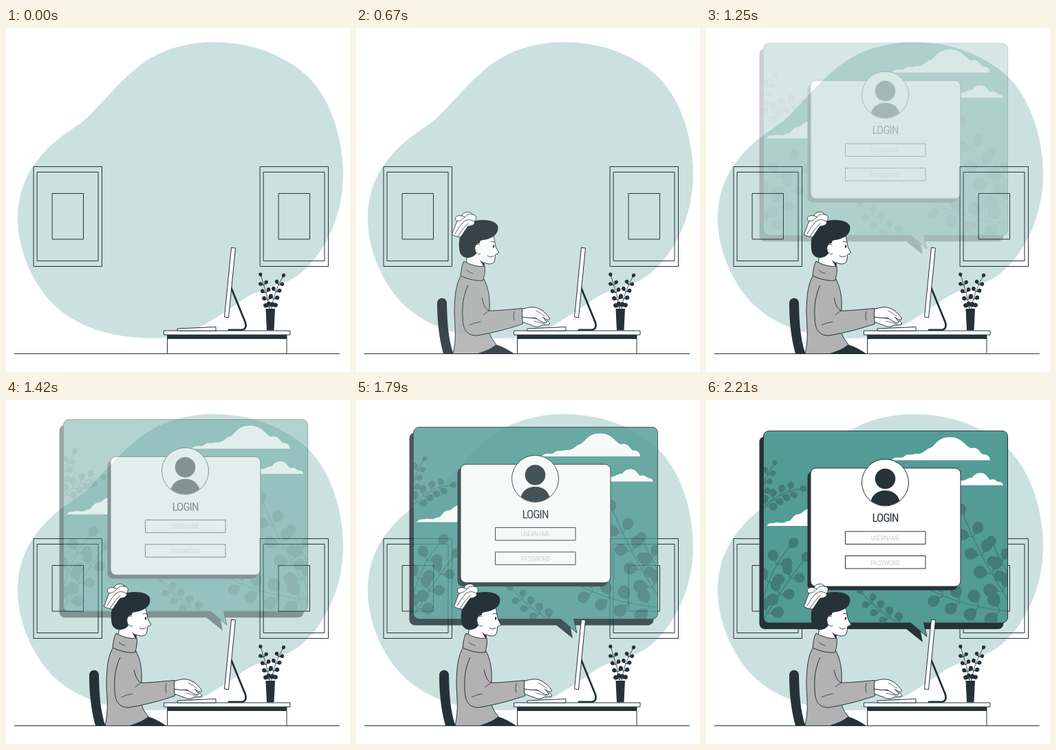
An HTML page that plays this animation: 500 by 500 pixels, repeating every 2250 ms.

```html
<!DOCTYPE html>
<html lang="en">
<head>
<meta charset="utf-8">
<title>Login</title>
<style>
  html, body { margin: 0; width: 100%; height: 100%; overflow: hidden; background: #fff; }
  svg { display: block; width: 100vw; height: 100vh; }
  .line { fill: none; stroke: #263238; stroke-linecap: round; stroke-linejoin: round; }
  .white { fill: #fff; stroke: #263238; stroke-linejoin: round; }
  .wool { fill: #b2b2b2; stroke: #263238; stroke-linejoin: round; }
  .dark { fill: #263238; }
  .teal { fill: #539b95; }
  text { font-family: "Roboto Condensed", "Roboto", "Open Sans", sans-serif; font-stretch: 75%; text-anchor: middle; }
  .title { font-size: 17px; letter-spacing: -.9px; fill: #263238; }
  .hint { font-size: 9.8px; font-weight: 300; letter-spacing: -.3px; fill: #b4b8ba; }
</style>
</head>
<body>
<svg viewBox="0 0 500 500">
  <defs>
    <clipPath id="screen"><rect x="84" y="45.500" width="354" height="278" rx="8"/></clipPath>
    <clipPath id="round"><circle cx="260.500" cy="120" r="33.500"/></clipPath>
    <g id="picture" class="line">
      <rect x="40.500" y="201.500" width="99" height="145"/>
      <rect x="45.500" y="209.500" width="88.500" height="129"/>
      <rect x="67.500" y="240.500" width="45" height="66.500"/>
    </g>
  </defs>

  <path fill="#cbe1df" d="M302 20.500C357 20.500 407 40 440 72C473 105 490 162 490 212C490 275 462 330 425 359C395 380 372 374 340 398C295 429 262 451 215 451C150 451 85 432 50 379C28 346 17 309 17 277C17 240 30 210 50 187C75 157 100 146 115 133C140 110 170 70 205 47C235 28 270 20.500 302 20.500Z"/>
  <use href="#picture"/>
  <use href="#picture" x="329"/>
  <path class="line" d="M12.500 473.500H484.500"/>

  <g id="panel">
    <g class="dark">
      <rect x="77.500" y="53" width="355" height="280" rx="8"/>
      <path d="M290 332L315 352L311 332Z"/>
    </g>
    <rect class="teal" x="83.500" y="45" width="355" height="279" rx="8" stroke="#263238"/>
    <path class="teal" d="M297 323.500L321 344L316.500 323.500" stroke="#263238"/>
    <path class="teal" d="M297.500 322.500H316V325H299Z"/>
    <g clip-path="url(#screen)">
      <g id="foliage"></g>
      <g fill="#fff">
        <path d="M270 87.500C275 81 282 85 287 83C292 77 299 81 305 78C315 80 318 72 325 70C333 68 335 54 355 54C372 54 378 68 385 70C395 67 398 76 402 79C410 78 413 84 413 87.500Z"/>
        <path d="M368 124V117C376 119 383 111 387 113C390 107 395 106 400 106C407 106 410 114 413 116C420 113 422 119 426 119C431 119 432 124 432 124Z"/>
        <path d="M88 183C92 177 98 180 102 178C108 178 112 180 118 176C124 178 126 166 134 166C140 166 140 160 152 157V183Z"/>
      </g>
    </g>
    <rect class="dark" x="147.500" y="104" width="218" height="172.500" rx="8"/>
    <rect class="white" x="152" y="99" width="218" height="172" rx="8"/>
    <circle class="white" cx="260.500" cy="120" r="34"/>
    <g class="dark" clip-path="url(#round)">
      <circle cx="260.500" cy="114.500" r="14.800"/>
      <path d="M238.500 154C239 139 248 131.500 260.500 131.500S282 139 282.500 154Z"/>
    </g>
    <text class="title" x="260.500" y="177.300">LOGIN</text>
    <rect class="white" x="202.500" y="191" width="116.500" height="18.500"/>
    <rect class="white" x="202.500" y="226.500" width="116.500" height="18.500"/>
    <text class="hint" x="260.500" y="204">USERNAME</text>
    <text class="hint" x="260.500" y="239.700">PASSWORD</text>
  </g>

  <g id="desk">
    <path class="line" stroke-width="2.800" d="M327 377L347.500 427C350 434 348 439 341 439H324"/>
    <path class="white" d="M327.500 319L333.500 320L323.500 421L317.500 420Z"/>
    <rect class="white" x="234.500" y="446" width="173.500" height="27.500"/>
    <rect class="dark" x="234.500" y="446" width="173.500" height="6"/>
    <rect class="white" x="229.500" y="440" width="183.500" height="6"/>
    <path class="white" d="M249 437L305 434.500V440H249Z"/>
    <g id="plant"></g>
    <path class="dark" d="M377.500 408H391L389.500 439.500H379Z"/>
  </g>

  <g id="worker">
    <path class="dark" d="M121 400C121 391 134 390 135 399C135.500 426 137 452 144.500 473.500H130C123.500 450 121 425 121 400Z"/>
    <path class="dark" d="M178 473.500L206 460C216 463 225 468 233 473.500Z"/>
    <path class="wool" d="M156 359C148 372 146.500 390 146 410C146 430 150 447 144 473.500H180C190 470 200 467 207 460C203 455 199 450 197 443L197 408C198 392 195 376 189 365Z"/>
    <path class="white" d="M244 420C256 421 268 422 276 426C282 425 286 428 284 431C280 432 277 431 273 432C268 436 262 434 258 432C252 430 248 428 244 427Z"/>
    <path class="white" d="M244 409C252 406 262 404 269 408C276 411 281 417 284.500 422C284.500 426 279 424 274 420C278 424 281 427 279 429C273 428 268 424 263 421C257 422 251 421 244 420Z"/>
    <path class="line" stroke-width=".7" d="M265 411Q271 414 277 419M262 426Q270 428 277 430"/>
    <path class="wool" d="M166 374C159 388 157 405 158 420C158 436 163 447 178 447C203 443 225 437 245.500 430C244 422 244 415 245 407.500C228 409 210 411 196 411C191 408 188 402 186 392"/>
    <path class="line" stroke-width=".8" d="M233 412Q231 420 233 425M196 411Q192 414 188 417M168 432Q175 428 184 427"/>

    <path class="white" d="M183 306L203 302C205 310 205 315 207 320L210.500 326C210 329 206 328 205.500 330L205 336C204 342 201 343 196 343L188 341L189 350L163 346L165 325Z"/>
    <path class="dark" d="M183 337L190 343L189 348Z"/>
    <path class="dark" d="M154 326C150 306 156 286 177 280C194 277 210 281 209.500 291C209 302 198 307 184 309C180 317 182 329 171 333C163 336 156 332 154 326Z"/>
    <path fill="#fff" d="M186 314C179 311 175 316 176 322C177 329 182 331 187 328Z"/>
    <path class="line" stroke-width=".8" d="M183 315C178 312 175 317 176 322C177 328 181 330 184 328"/>
    <ellipse class="dark" cx="203" cy="317.500" rx="1.200" ry="2.300"/>
    <path class="line" stroke-width=".9" d="M199 311Q202 309 204 311M194 331Q199 335 203 331"/>
    <path class="wool" d="M160 339C157 344 156 352 155 360C165 365 178 368 187.500 367C190 360 191 352 190 346C182 348 168 344 160 339Z"/>
    <path class="line" stroke-width=".8" d="M164 352Q168 356 173 357"/>

    <path class="white" stroke-width=".9" d="M142 300C146 293 147 286 150 281C144 277 149 271 157 273C158 267 170 265 172 271C178 271 179 277 175 281C177 285 172 288 166 288C162 293 158 300 155 304C150 304 146 302 142 300Z"/>
    <path class="line" stroke-width=".8" d="M150 281Q156 281 161 275Q166 269 172 271M157 273Q160 274 161 275M147 299Q152 289 160 281Q167 276 175 281M151 303Q158 291 166 284"/>
  </g>
</svg>
<script>
const $ = id => document.getElementById(id);

// A curved stem with stalked leaves in pairs and one at the tip.
function branch([x0, y0, cx, cy, x1, y1], pairs, len, color, stem) {
  const leaf = (x, y, angle, l) => {
    const w = l * .4, base = l * .22;
    return `<g transform="translate(${x} ${y}) rotate(${angle})">` +
      `<path d="M0 0H${l / 2}" stroke="${color}" stroke-width="${stem}"/><path fill="${color}" ` +
      `d="M${base} 0C${l * .4} ${-w} ${l * .9} ${-w * 1.2} ${l} 0C${l * .9} ${w * 1.2} ${l * .4} ${w} ${base} 0Z"/></g>`;
  };
  let out = `<path d="M${x0} ${y0}Q${cx} ${cy} ${x1} ${y1}" fill="none" stroke="${color}" stroke-width="${stem}"/>`;
  for (let i = 0; i <= pairs; i++) {
    const t = .12 + .88 * i / pairs, u = 1 - t;
    const x = u * u * x0 + 2 * u * t * cx + t * t * x1;
    const y = u * u * y0 + 2 * u * t * cy + t * t * y1;
    const dx = u * (cx - x0) + t * (x1 - cx), dy = u * (cy - y0) + t * (y1 - cy);
    const a = Math.atan2(dy, dx) * 180 / Math.PI;
    const l = len * (1 - .2 * t);
    out += i === pairs ? leaf(x, y, a, l) : leaf(x, y, a - 52, l) + leaf(x, y, a + 52, l);
  }
  return out;
}

const shade = "#427c77", ink = "#263238";
$("foliage").innerHTML = [
  [[80, 142, 84, 115, 96, 97], 3, 14],
  [[82, 160, 103, 134, 133, 130], 4, 17],
  [[78, 312, 90, 250, 118, 218], 3, 27],
  [[82, 322, 112, 272, 138, 238], 3, 25],
  [[290, 330, 255, 312, 230, 284], 4, 18],
  [[440, 292, 402, 235, 376, 172], 4, 29],
  [[445, 308, 370, 300, 322, 274], 4, 29],
  [[446, 262, 430, 240, 420, 216], 2, 25]
].map(([curve, pairs, len]) => branch(curve, pairs, len, shade, 1.3)).join("");

$("plant").innerHTML =
  branch([384, 412, 380, 388, 371.5, 363], 4, 10, ink, .8) +
  branch([385, 412, 389, 385, 401, 364], 4, 10, ink, .8);

const LOOP = 2250, STEP = LOOP / 54;

function enter(id, from, start, end, easing) {
  const shown = { opacity: 1, transform: "translate(0px, 0px)" };
  const hidden = { opacity: 0, transform: from };
  const anim = $(id).animate([
    { ...hidden, offset: 0 },
    { ...hidden, offset: start / LOOP, easing },
    { ...shown, offset: end / LOOP },
    { ...shown, offset: 1 }
  ], { duration: LOOP, fill: "both" });
  anim.pause();
  return anim;
}

const anims = [
  enter("worker", "translate(-30px, 0px)", 0, 1125, "cubic-bezier(.36, -.01, .5, 1.38)"),
  enter("panel", "translate(0px, -30px)", 1080, 2205, "ease-out")
];

const origin = performance.now();
function draw() {
  const t = (performance.now() - origin) % LOOP;
  const step = Math.min(53, Math.floor((t + 2) / STEP));
  const time = step < 3 ? 0 : step * STEP;
  for (const a of anims) a.currentTime = time;
  requestAnimationFrame(draw);
}
draw();
</script>
</body>
</html>
```
